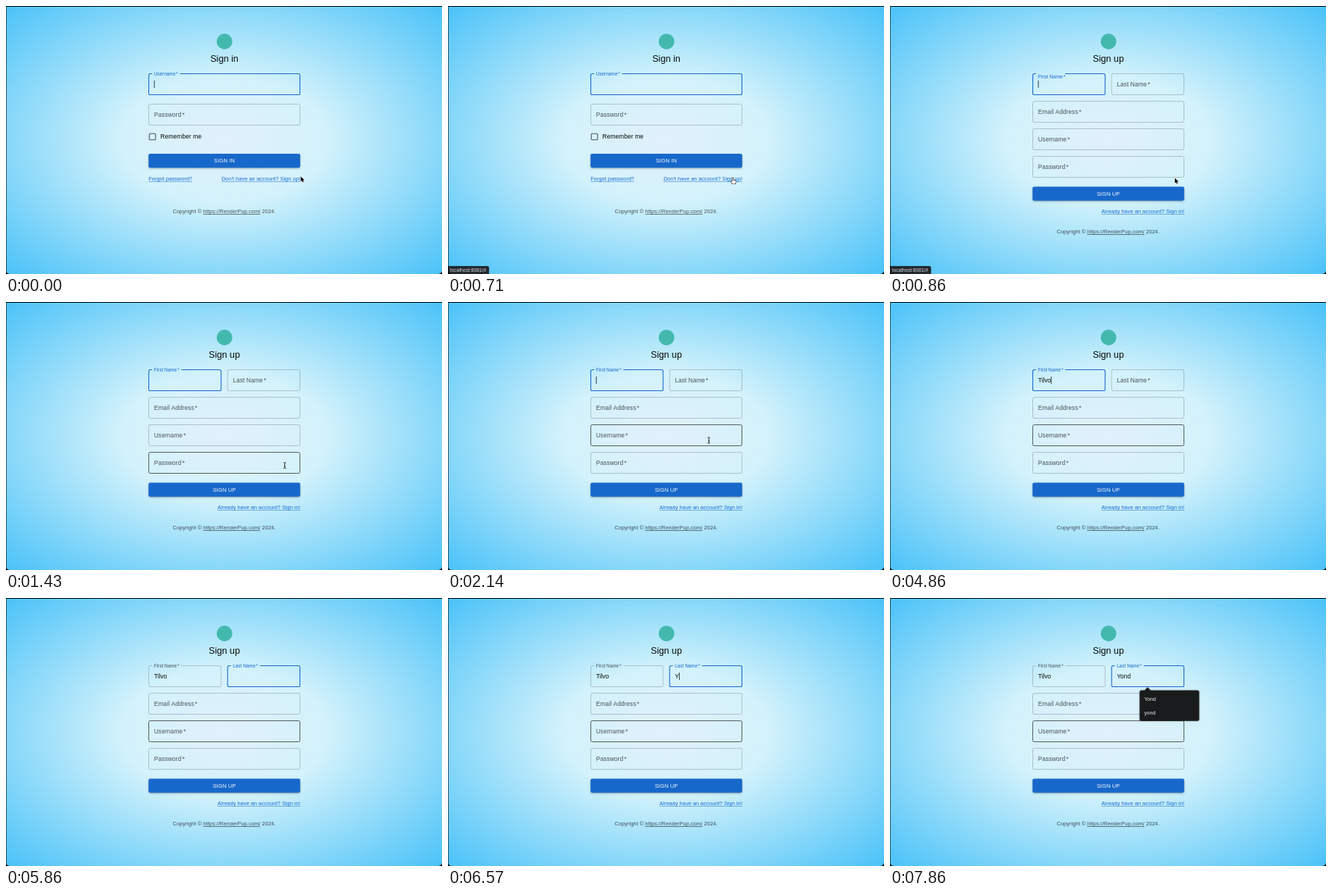
An HTML page with a canvas that plays this animation: 600 px wide and 370 px high, repeating every 8 s.

```html
<!DOCTYPE html>
<html lang="en">
<head>
<meta charset="utf-8">
<title>Sign up</title>
<style>
  html, body { margin: 0; width: 100%; height: 100%; overflow: hidden; }
  canvas { display: block; width: 600px; height: 370px; }
</style>
</head>
<body>
<canvas id="stage" width="600" height="370"></canvas>
<script>
const ctx = document.getElementById('stage').getContext('2d');
const FONT = '"Liberation Sans", Arial, sans-serif';
const LOOP = 8000;
const SCALE = 0.5265; // CSS pixels of the page to stage pixels
const BODY = 16 * SCALE, SMALL = 14 * SCALE;
const BLUE = '#1768cb', GREY = 'rgba(0,0,0,.66)', BLACK = '#0a0a0a';
const FIRST = 'Tilvo', LAST = 'Yond';

const SIGN_UP = 785, STATUS_ON = 350, STATUS_OFF = 1350;
const FOCUS_LAST = 5150, POPUP = 6600;
const TYPE_FIRST = { start: 3900, step: 150 };
const TYPE_LAST = { start: 6500, step: 150 };

const clamp = v => Math.min(1, Math.max(0, v));
const smooth = v => v * v * (3 - 2 * v);
const mix = (a, b, p) => a + (b - a) * p;

// cubic-bezier(0, 0, .2, 1)
function easeOut(x) {
  let lo = 0, hi = 1;
  for (let i = 0; i < 20; i++) {
    const u = (lo + hi) / 2;
    if (.6 * u * u * (1 - u) + u ** 3 < x) lo = u; else hi = u;
  }
  return 3 * lo * lo * (1 - lo) + lo ** 3;
}

function setFont(size, spacing = .0095) {
  ctx.font = `${size}px ${FONT}`;
  ctx.letterSpacing = `${size * spacing}px`;
}

function width(text, size, spacing) {
  setFont(size, spacing);
  return ctx.measureText(text).width;
}

function write(text, x, y, size, color, align = 0, spacing) {
  const w = width(text, size, spacing);
  ctx.fillStyle = color;
  ctx.fillText(text, x - w * align, y);
  return x + w * (1 - align);
}

function box(x, y, w, h, r) {
  ctx.beginPath();
  ctx.roundRect(x, y, w, h, r);
}

function underline(x0, x1, baseline, color) {
  ctx.fillStyle = color;
  ctx.fillRect(x0, Math.floor(baseline + 1.2), x1 - x0, 1);
}

function link(text, x, y, align) {
  const w = width(text, SMALL);
  write(text, x - w * align, y, SMALL, BLUE);
  underline(x - w * align, x + w * (1 - align), y, 'rgba(23,104,203,.5)');
}

function typed(text, { start, step }, t) {
  return text.slice(0, Math.max(0, Math.floor((t - start) / step) + 1));
}

// Ellipse through the stage corners, with a pale plateau in the middle.
function background() {
  const g = ctx.createRadialGradient(0, 0, 0, 0, 0, Math.SQRT2);
  g.addColorStop(0, '#e1f0fc');
  g.addColorStop(.33, '#d3f2fb');
  g.addColorStop(1, '#4ac2f8');
  ctx.save();
  ctx.translate(300, 185);
  ctx.scale(300, 185);
  ctx.fillStyle = g;
  ctx.fillRect(-1, -1, 2, 2);
  ctx.restore();
}

function windowEdge() {
  ctx.fillStyle = '#000';
  ctx.fillRect(0, 0, 600, 1);
  ctx.beginPath();
  ctx.rect(0, 0, 600, 370);
  ctx.roundRect(0, -10, 600, 380, 5);
  ctx.fill('evenodd');
  ctx.fillStyle = 'rgba(0,0,0,.6)';
  ctx.fillRect(0, 0, 1, 370);
}

// shrink: 0 = label inside the field, 1 = label on the border
function field({ x = 196.5, y, w = 208, label, value = '', focused, hovered, shrink = 0, caret }) {
  const size = BODY * mix(1, .75, shrink);
  const labelX = x + 7.2;
  const labelWidth = width(label, BODY * .75) + BODY * .75 * .56;

  ctx.save();
  if (shrink > 0) {
    ctx.beginPath();
    ctx.rect(x - 2, y - 2, w + 4, 33);
    ctx.rect(labelX - 2.6, y - 2, labelWidth + 5.2, 4);
    ctx.clip('evenodd');
  }
  ctx.strokeStyle = focused ? BLUE : hovered ? 'rgba(0,0,0,.62)' : 'rgba(0,0,0,.2)';
  ctx.lineWidth = focused ? 1.1 : 1;
  box(x, y, w, 29, 2.1);
  ctx.stroke();
  ctx.restore();

  const color = focused ? BLUE : GREY;
  const baseline = y + mix(17.4, 2.1, shrink);
  const end = write(label, labelX, baseline, size, color);
  write('*', end + size * .14, baseline, size, color);

  const valueEnd = write(value, labelX, y + 17.4, BODY, BLACK);
  if (focused && caret) {
    ctx.fillStyle = BLACK;
    ctx.fillRect(valueEnd, y + 9.5, .8, 10);
  }
}

function button(text, y) {
  ctx.save();
  ctx.shadowColor = 'rgba(0,0,0,.35)';
  ctx.shadowBlur = 2.5;
  ctx.shadowOffsetY = 1;
  ctx.fillStyle = BLUE;
  box(196.2, y, 208.6, 19.2, 2.1);
  ctx.fill();
  ctx.restore();
  write(text, 300.6, y + 12.2, SMALL, '#fff', .5, .0286);
}

function header(title) {
  ctx.fillStyle = '#43b9ad';
  ctx.beginPath();
  ctx.arc(300.7, 49, 10.7, 0, 7);
  ctx.fill();
  write(title, 300.5, 76.6, 24 * SCALE, BLACK, .5, 0);
}

function copyright(y) {
  const parts = ['Copyright © ', 'https://RenderPup.com/', ' 2024.'];
  let x = 300.3 - width(parts.join(''), SMALL) / 2;
  parts.forEach((part, i) => {
    const end = write(part, x, y, SMALL, GREY);
    if (i === 1) underline(x, end, y, 'rgba(0,0,0,.5)');
    x = end;
  });
}

function signIn(caret) {
  header('Sign in');
  field({ y: 93.5, label: 'Username', focused: true, shrink: 1, caret });
  field({ y: 135.5, label: 'Password' });
  ctx.strokeStyle = GREY;
  ctx.lineWidth = 1.1;
  box(197.2, 176.2, 8.6, 8.6, 1);
  ctx.stroke();
  write('Remember me', 212.6, 183.4, BODY, BLACK);
  button('SIGN IN', 204);
  link('Forgot password?', 196.2, 241, 0);
  link("Don't have an account? Sign up!", 405, 241, 1);
  copyright(286);
}

function signUp(t, caret, pointer) {
  const onLast = t >= FOCUS_LAST;
  const hover = y => pointer.x > 196 && pointer.x < 405 && pointer.y > y && pointer.y < y + 29;
  header('Sign up');
  field({ y: 93.5, w: 99.5, label: 'First Name', value: typed(FIRST, TYPE_FIRST, t),
          focused: !onLast, shrink: easeOut(clamp((t - SIGN_UP) / 200)), caret });
  field({ x: 305, y: 93.5, w: 99.5, label: 'Last Name', value: typed(LAST, TYPE_LAST, t),
          focused: onLast, shrink: easeOut(clamp((t - FOCUS_LAST) / 200)), caret });
  ['Email Address', 'Username', 'Password'].forEach((label, i) => {
    const y = 131.5 + i * 38;
    field({ y, label, hovered: hover(y) });
  });
  button('SIGN UP', 249.5);
  link('Already have an account? Sign in!', 405, 286.4, 1);
  copyright(314.4);
}

function popup() {
  ctx.save();
  ctx.shadowColor = 'rgba(0,0,0,.3)';
  ctx.shadowBlur = 3;
  ctx.fillStyle = '#1a1b1c';
  box(343.5, 127.5, 82, 42.3, 2.5);
  ctx.moveTo(349.8, 128);
  ctx.lineTo(354.5, 123.2);
  ctx.lineTo(359.2, 128);
  ctx.fill();
  ctx.restore();
  write(LAST, 350, 142, 7, '#eee');
  write(LAST.toLowerCase(), 350, 161, 7, '#eee');
}

function statusBar() {
  ctx.fillStyle = '#23282d';
  box(0, 359, 56.5, 12, [0, 2.5, 0, 0]);
  ctx.fill();
  write('localhost:8081/#', 3, 367.2, 6.8, '#d8dfe4', 0, 0);
}

function pointerAt(t) {
  const a = smooth(clamp((t - 140) / 300));
  const b = smooth(clamp((t - 1200) / 700));
  return { x: mix(mix(405.6, 392, a), 359, b), y: mix(mix(235.2, 237.4, a), 191, b) };
}

const SHAPES = {
  arrow: new Path2D('M0 0V7.3L1.7 5.8L2.8 8.3L4 7.8L2.9 5.4H5.2Z'),
  hand: new Path2D('M-.6 0Q0-.7.6 0V3L3.6 3.8Q4.2 4 4 5L3.4 8H-.6L-2.6 5Q-2.4 4-.6 5Z'),
  beam: new Path2D('M-1.7-4Q0-4 0-3Q0-4 1.7-4M0-3V3M-1.7 4Q0 4 0 3Q0 4 1.7 4M-.9 1H.9')
};

function drawPointer({ x, y }, t) {
  const kind = t < SIGN_UP ? (x < 405 ? 'hand' : 'arrow')
    : y < 236.5 && (y - 131.5) % 38 < 29 ? 'beam' : 'arrow';
  ctx.save();
  ctx.translate(x, y);
  ctx.lineWidth = kind === 'hand' ? 1.3 : .9;
  ctx.strokeStyle = kind === 'arrow' ? '#fff' : '#111';
  ctx.fillStyle = kind === 'hand' ? '#fff' : '#000';
  ctx.stroke(SHAPES[kind]);
  if (kind !== 'beam') ctx.fill(SHAPES[kind]);
  ctx.restore();
}

// The caret restarts its blink at every focus change and key press.
const keys = (text, { start, step }) => [...text].map((_, i) => start + i * step);
const caretResets = [-100, SIGN_UP, ...keys(FIRST, TYPE_FIRST), FOCUS_LAST, ...keys(LAST, TYPE_LAST)];

function draw(t) {
  const caret = (t - caretResets.filter(r => r <= t).pop()) % 1000 < 500;
  const pointer = pointerAt(t);
  background();
  if (t < SIGN_UP) signIn(caret); else signUp(t, caret, pointer);
  if (t >= STATUS_ON && t < STATUS_OFF) statusBar();
  if (t >= POPUP) popup();
  windowEdge();
  if (t < TYPE_FIRST.start) drawPointer(pointer, t);
}

const began = performance.now();
function tick() {
  draw((performance.now() - began) % LOOP);
  requestAnimationFrame(tick);
}
tick();
</script>
</body>
</html>
```
